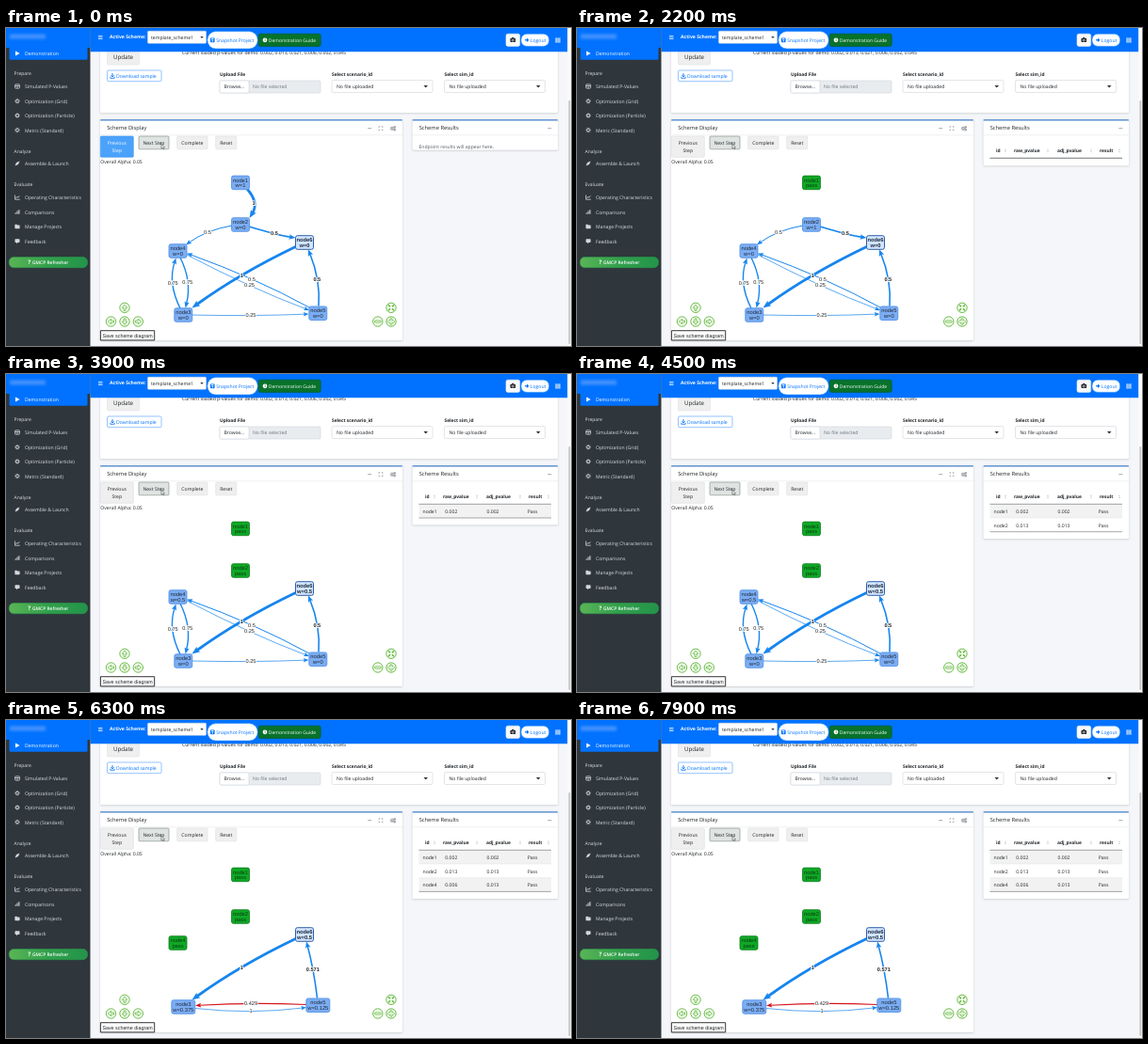
These frames come from a looping animation (600 px wide and 338 px high, 8000 ms). An HTML page with a canvas:

```html
<!DOCTYPE html>
<html lang="en">
<head>
<meta charset="utf-8">
<title>Scheme demonstration</title>
<style>
html, body { margin: 0; width: 100%; height: 100%; overflow: hidden; background: #f4f6f9; }
canvas { display: block; width: 600px; height: 338px; }
</style>
</head>
<body>
<canvas id="stage"></canvas>
<script>
const W = 600, H = 338, LOOP = 8000;
const canvas = document.getElementById('stage');
const c = canvas.getContext('2d');
const ratio = window.devicePixelRatio || 1;
canvas.width = W * ratio;
canvas.height = H * ratio;
c.textRendering = 'geometricPrecision';

const UI = '"Open Sans", "Noto Sans", sans-serif';
const GRAPH = '"Liberation Sans", Arial, sans-serif';
const BLUE = '#0072ff', INK = '#212529', EDGE = '#1685ee';

// Each click flashes the button, then the graph and the table follow.
const CLICKS = [[1600, 2000], [3500, 3900], [5500, 5900]];
const GRAPH_AT = [2000, 3900, 5900];
const ROW_AT = [2400, 4100, 6200];
const ROWS = [['node1', '0.002', '0.002'], ['node2', '0.013', '0.013'], ['node4', '0.006', '0.013']];
const passed = (times, t) => times.filter(at => t >= at).length;

function text(s, x, y, o = {}) {
  const size = o.size || 5.1;
  c.font = `${o.weight || 400} ${size}px ${o.font || UI}`;
  c.textAlign = o.align || 'left';
  c.textBaseline = 'alphabetic';
  c.fillStyle = o.color || INK;
  c.fillText(s, x, y + size * (o.font ? 0.35 : 0.41));
}

function box(x, y, w, h, fill, border, r = 0, line = 0.6) {
  c.beginPath();
  c.roundRect(x, y, w, h, r);
  if (fill) { c.fillStyle = fill; c.fill(); }
  if (border) { c.strokeStyle = border; c.lineWidth = line; c.stroke(); }
}

function path(points, color, width = 0.7, close = false, fill = null) {
  c.beginPath();
  points.forEach(([x, y], i) => i ? c.lineTo(x, y) : c.moveTo(x, y));
  if (close) c.closePath();
  if (fill) { c.fillStyle = fill; c.fill(); }
  if (color) { c.strokeStyle = color; c.lineWidth = width; c.stroke(); }
}

function ring(x, y, r, color, width = 0.7, fill = null) {
  c.beginPath();
  c.arc(x, y, r, 0, Math.PI * 2);
  if (fill) { c.fillStyle = fill; c.fill(); }
  if (color) { c.strokeStyle = color; c.lineWidth = width; c.stroke(); }
}

function card(x, y, w, h, title) {
  c.save();
  c.shadowColor = 'rgba(0,0,0,.22)';
  c.shadowBlur = 2 * ratio;
  c.shadowOffsetY = 0.5 * ratio;
  box(x, y, w, h, '#fff', null, 1);
  c.restore();
  if (!title) return;
  box(x, y, w, 1.4, '#3f80cc', null, 0.7);
  text(title, x + 7.2, y + 8.3, { size: 5.75 });
  path([[x, y + 16.6], [x + w, y + 16.6]], '#dfe2e6', 0.5);
}

function gear(x, y, r, color) {
  for (let i = 0; i < 8; i++) {
    const a = i * Math.PI / 4, dx = Math.cos(a), dy = Math.sin(a);
    path([[x + dx * r * 0.6, y + dy * r * 0.6], [x + dx * r, y + dy * r]], color, 0.8);
  }
  ring(x, y, r * 0.55, color, 0.9);
}

const ICONS = {
  table(x, y, k) {
    box(x - 2.4, y - 2.1, 4.8, 4.2, null, k, 0.6, 0.8);
    path([[x - 2.4, y - 0.5], [x + 2.4, y - 0.5]], k, 0.8);
    path([[x, y - 0.5], [x, y + 2]], k, 0.7);
  },
  gear(x, y, k) { gear(x, y, 2.7, k); },
  rocket(x, y, k) {
    path([[x - 2.5, y + 2.5], [x - 1, y - 1], [x + 2.5, y - 2.5], [x + 1, y + 1]], null, 0, true, k);
  },
  chart(x, y, k) {
    path([[x - 2.5, y - 2.4], [x - 2.5, y + 2.2], [x + 2.7, y + 2.2]], k, 0.8);
    path([[x - 1.4, y + 0.9], [x - 0.2, y - 0.8], [x + 0.8, y + 0.2], [x + 2.3, y - 1.6]], k, 0.8);
  },
  bars(x, y, k) {
    [1.6, 3.2, 4.6].forEach((h, i) => box(x - 2.3 + i * 1.8, y + 2.3 - h, 1.1, h, k));
  },
  folder(x, y, k) {
    box(x - 2.6, y - 1.5, 5.2, 3.7, k, null, 0.6);
    box(x - 2.6, y - 2.2, 2.4, 1.5, k, null, 0.4);
  },
  chat(x, y, k) {
    box(x - 2.5, y - 2.2, 5, 3.6, k, null, 0.7);
    path([[x - 1, y + 1], [x - 1, y + 2.7], [x + 1, y + 1]], null, 0, true, k);
  }
};

const MENU = [
  [62, 'Simulated P-Values', 'table'], [77.7, 'Optimization (Grid)', 'gear'],
  [93, 'Optimization (Particle)', 'gear'], [108.5, 'Metric (Standard)', 'gear'],
  [144, 'Assemble & Launch', 'rocket'], [180, 'Operating Characteristics', 'chart'],
  [195.5, 'Comparisons', 'bars'], [211, 'Manage Projects', 'folder'], [226.5, 'Feedback', 'chat']
];

function sidebar() {
  box(0, 0, 89.5, H, '#2f373d');
  box(0, 0, 89.5, 21, BLUE);
  c.save();
  c.filter = `blur(${1.6 * ratio}px)`;
  box(4, 6.5, 38, 5, '#4592ff');
  c.restore();
  box(3.5, 19, 83, 14.8, BLUE, null, 1.5);
  path([[10, 24.4], [14.6, 27], [10, 29.6]], null, 0, true, '#fff');
  text('Demonstration', 20, 26.8, { color: '#fff' });
  [['Prepare', 48], ['Analyze', 130.5], ['Evaluate', 166.3]].forEach(([s, y]) =>
    text(s, 8.5, y, { color: '#dde1e6', size: 5 }));
  MENU.forEach(([y, label, icon]) => {
    ICONS[icon](12, y, '#d3d7dd');
    text(label, 20, y, { color: '#d9dde3' });
  });
  const g = c.createLinearGradient(3, 0, 87, 0);
  g.addColorStop(0, '#5ab556');
  g.addColorStop(0.5, '#31a04c');
  g.addColorStop(1, '#23934a');
  box(3.2, 243.5, 83.3, 11.2, g, '#2a9a48', 5);
  text('?', 24.8, 248.8, { color: '#fff', size: 6.2, weight: 700, align: 'center' });
  text('GMCP Refresher', 28, 248.8, { color: '#fff', size: 4.9, weight: 600 });
}

function navbar() {
  box(89.5, 0, W - 89.5, 25.2, BLUE);
  [-1.6, 0, 1.6].forEach(d => path([[98, 10 + d], [102.5, 10 + d]], '#fff', 0.7));
  text('Active Scheme:', 110, 9.3, { color: '#fff', weight: 700 });
  box(150.5, 3.3, 62, 13, '#fff', '#ced4da', 1);
  text('template_scheme1', 154, 9.7);
  path([[206.3, 9], [209.7, 9], [208, 11]], null, 0, true, '#343a40');
  box(213.8, 3.6, 53.5, 18.5, '#fff', '#1c86ff', 9);
  box(217, 10.6, 4.6, 4.6, BLUE, null, 0.6);
  box(218, 11.2, 2.4, 1.2, '#fff');
  ring(219.3, 13.8, 0.7, null, 0, '#fff');
  text('Snapshot Project', 223.2, 12.8, { color: BLUE });
  box(268.2, 6.2, 66, 13.2, '#08722b', '#045c20', 2);
  ring(275, 12.8, 2.4, null, 0, '#fff');
  text('i', 275, 12.5, { color: '#08722b', size: 4, weight: 700, align: 'center' });
  text('Demonstration Guide', 278.8, 12.6, { color: '#fff', size: 5, weight: 500 });
  box(531, 6.2, 14.7, 13.2, '#f8f9fa', '#e2e6ea', 2);
  box(535.5, 10.9, 5.6, 4.1, INK, null, 0.7);
  box(537.1, 10, 2.4, 1.5, INK);
  ring(538.3, 13, 1.1, '#fff', 0.6);
  box(547, 6.2, 29.7, 13.2, '#fff', '#1c86ff', 6);
  path([[551, 12.8], [554.4, 12.8]], BLUE, 1.2);
  path([[553, 10.6], [555.4, 12.8], [553, 15]], null, 0, true, BLUE);
  text('Logout', 556.8, 12.7, { color: BLUE });
  for (let i = 0; i < 9; i++) box(583.4 + i % 3 * 1.9, 10.4 + Math.floor(i / 3) * 1.9, 1.4, 1.4, '#fff');
}

function picker(x, label) {
  text(label, x, 48.7, { weight: 700, size: 4.9 });
  box(x, 55.5, 107, 13, '#fff', '#ced4da', 1.5);
  text('No file uploaded', x + 5, 62);
  path([[x + 97.5, 60.9], [x + 102, 60.9], [x + 99.7, 63.4]], null, 0, true, '#333');
}

function inputs() {
  card(100, 18, 486, 72.3);
  text('Current loaded p-values for demo: 0.002, 0.013, 0.021, 0.006, 0.002, 0.045', 187, 25.9);
  box(107.5, 20, 34, 19, '#efefef', '#dfe1e3', 1);
  text('Update', 124.5, 30.3, { size: 6.2, align: 'center' });
  box(107.5, 45, 57.5, 11.7, '#fff', '#4c9dff', 1.5);
  path([[113, 48.2], [113, 51.6]], BLUE, 1);
  path([[111.3, 50.3], [113, 52], [114.7, 50.3]], BLUE, 0.8);
  path([[110.8, 51.8], [110.8, 53.3], [115.2, 53.3], [115.2, 51.8]], BLUE, 0.8);
  text('Download sample', 117, 50.6, { color: BLUE });
  text('Upload File', 227, 48.7, { weight: 700, size: 4.9 });
  box(227, 56, 107, 13, '#e9ecef', '#ced4da', 1.5);
  box(227, 56, 31, 13, '#fff', '#ced4da', 1.5);
  text('Browse...', 231.5, 62.4);
  text('No file selected', 262, 62.4, { color: '#6c757d' });
  picker(346, 'Select scenario_id');
  picker(465.5, 'Select sim_id');
}

function button(x, y, w, h, lines, fill, border, color) {
  box(x, y, w, h, fill, border, 1);
  lines.forEach((s, i) =>
    text(s, x + w / 2, y + h / 2 + (i - (lines.length - 1) / 2) * 8.2, { align: 'center', color }));
}

// A quadratic edge that passes through its middle point m.
function edge(a, m, b, width, label, o = {}) {
  const color = o.color || EDGE;
  const k = [2 * m[0] - (a[0] + b[0]) / 2, 2 * m[1] - (a[1] + b[1]) / 2];
  const ang = Math.atan2(b[1] - k[1], b[0] - k[0]);
  const len = 4.8 + width * 1.3, half = len * 0.4;
  const ux = Math.cos(ang), uy = Math.sin(ang);
  const base = [b[0] - ux * len, b[1] - uy * len];
  c.beginPath();
  c.moveTo(...a);
  c.quadraticCurveTo(...k, b[0] - ux * len * 0.7, b[1] - uy * len * 0.7);
  c.strokeStyle = color;
  c.lineWidth = width;
  c.stroke();
  path([b, [base[0] - uy * half, base[1] + ux * half], [base[0] + ux * len * 0.2, base[1] + uy * len * 0.2],
    [base[0] + uy * half, base[1] - ux * half]], null, 0, true, color);
  const size = 5.6, [x, y] = m, weight = o.bold ? 700 : 400;
  c.font = `${weight} ${size}px ${GRAPH}`;
  c.textAlign = 'center';
  c.lineWidth = 1.8;
  c.lineJoin = 'round';
  c.strokeStyle = '#fff';
  c.strokeText(label, x, y + size * 0.35);
  text(label, x, y, { size, font: GRAPH, align: 'center', weight, color: '#222' });
}

function node(x, y, name, weight, o = {}) {
  const w = weight.length > 5 ? 25 : 19;
  const fill = o.pass ? '#10a827' : o.chosen ? '#d2e5ff' : '#7cadf2';
  const border = o.pass ? '#0b7d1b' : o.chosen ? '#2f5fa8' : '#4a8ee6';
  box(x - w / 2, y - 7.3, w, 14.6, fill, border, 2, o.chosen ? 1 : 0.8);
  const style = { size: 5.8, font: GRAPH, align: 'center', weight: o.chosen ? 700 : 400, color: o.pass ? '#063f0c' : '#1d2b3d' };
  text(name, x, y - 2.8, style);
  text(o.pass ? 'pass' : weight, x, y + 2.9, style);
}

function graph(step) {
  if (step < 1) edge([256, 171], [263, 186], [258.5, 202], 2.8, '1', { bold: true });
  if (step < 2) {
    edge([240, 210], [214, 217.5], [191, 230.5], 1, '0.5');
    edge([258, 211], [285, 218.5], [307.5, 223], 1.7, '0.5', { bold: true });
  }
  if (step < 3) {
    edge([185, 244], [192.7, 270], [190.5, 297.5], 1.4, '0.75');
    edge([185, 298], [177.2, 271.2], [180.5, 244.5], 1.4, '0.75');
    edge([192, 241], [258.5, 273.5], [322, 300], 0.7, '0.25');
    edge([322, 297], [261, 267], [192, 239.5], 1, '0.5');
    edge([197.5, 305], [260, 305.5], [321.5, 304], 0.7, '0.25');
    edge([332, 295.5], [330.3, 266.8], [321, 235.5], 1.6, '0.5', { bold: true });
  } else {
    edge([201, 306.5], [260, 309.5], [319, 305.5], 0.7, '1');
    edge([319, 302.5], [260, 301.5], [201, 303.5], 1.1, '0.429', { color: '#d4151b' });
    edge([330.5, 295.5], [325.8, 265.3], [319, 235.5], 1.6, '0.571', { bold: true });
  }
  edge([307.5, 232.5], [250.3, 263], [197.5, 297.5], 2.9, '1', { bold: true });
  node(249, 164.4, 'node1', 'w=1', { pass: step > 0 });
  node(249, 209, 'node2', step > 0 ? 'w=1' : 'w=0', { pass: step > 1 });
  node(182.5, 237, 'node4', step > 1 ? 'w=0.5' : 'w=0', { pass: step > 2 });
  node(317, 228, 'node6', step > 1 ? 'w=0.5' : 'w=0', { chosen: true });
  node(188.3, 305, 'node3', step > 2 ? 'w=0.375' : 'w=0');
  node(331.3, 303.2, 'node5', step > 2 ? 'w=0.125' : 'w=0');
}

function controls() {
  const green = '#5cb636';
  const disc = (x, y) => ring(x, y, 5.2, green, 0.9, '#f4fbf0');
  [[126, 297.3, -90], [111.5, 312, 180], [126, 312, 90], [140.3, 312, 0]].forEach(([x, y, deg]) => {
    disc(x, y);
    c.save();
    c.translate(x, y);
    c.rotate(deg * Math.PI / 180);
    path([[-3, -1], [0, -1], [0, -2.6], [3.2, 0], [0, 2.6], [0, 1], [-3, 1]], green, 0.8, true, '#fff');
    c.restore();
  });
  disc(409, 297.3);
  [[-1, -1], [1, -1], [-1, 1], [1, 1]].forEach(([i, j]) =>
    path([[409 + i, 297.3 + j], [409 + i * 3, 297.3 + j * 3]], green, 1.4));
  disc(394.8, 312);
  disc(409, 312);
  [394.8, 409].forEach(x => box(x - 3.2, 311, 6.4, 2, '#fff', green, 0.4, 0.8));
  box(408, 308.8, 2, 6.4, '#fff', green, 0.4, 0.8);
  box(406.2, 311.4, 5.6, 1.2, '#fff');
}

function display(t, step) {
  card(100, 97.2, 321, 234.8, 'Scheme Display');
  const gray = '#8a9097';
  path([[384.2, 106.7], [388.2, 106.7]], gray, 0.8);
  [[-1, -1], [1, -1], [-1, 1], [1, 1]].forEach(([i, j]) =>
    path([[398 + i * 0.8, 106.7 + j * 2], [398 + i * 2, 106.7 + j * 2], [398 + i * 2, 106.7 + j * 0.8]], gray, 0.7));
  gear(410, 106.8, 2.2, gray);
  gear(412.8, 105.4, 1.2, gray);
  gear(412.8, 108.2, 1.2, gray);

  const fresh = t < CLICKS[0][0];
  const pressed = CLICKS.some(([from, to]) => t >= from && t < to);
  button(100.3, 115, 35, 22.3, ['Previous', 'Step'], fresh ? '#4ba2fb' : '#efefef', fresh ? '#3d94ee' : '#dcdee0', fresh ? '#fff' : INK);
  button(141, 115, 32, 13.8, ['Next Step'], pressed ? '#8fbc99' : '#dfe3e2', pressed ? '#72a57e' : '#78877f', pressed ? '#3f6a4b' : INK);
  button(181.7, 115, 32.3, 13.8, ['Complete'], '#efefef', '#dcdee0');
  button(222.7, 115, 22, 13.8, ['Reset'], '#efefef', '#dcdee0');
  text('Overall Alpha: 0.05', 100.3, 141.7);
  graph(step);
  controls();
  box(100.4, 321.7, 57.3, 10.2, '#fbfbfb', '#222', 0, 0.9);
  text('Save scheme diagram', 129, 326.8, { size: 5.35, align: 'center', font: GRAPH });
  // pointer
  path([[165, 123.4], [165, 128.2], [166.3, 127.3], [167.2, 128.9], [167.9, 128.5], [167.2, 127], [168.5, 126.9]],
    '#555', 0.6, true, '#f2f2f2');
}

function results(step, rows) {
  const h = step < 1 ? 32.5 : rows < 1 ? 49.3 : 48.6 + rows * 14.7;
  card(431.5, 97.2, 154.5, h, 'Scheme Results');
  path([[575.3, 106.7], [579.3, 106.7]], '#8a9097', 0.8);
  if (step < 1) {
    text('Endpoint results will appear here.', 438.5, 126.3, { color: '#555b61' });
    return;
  }
  [['id', 445, 455], ['raw_pvalue', 464, 500], ['adj_pvalue', 510, 546], ['result', 555, 576]].forEach(([s, x, sort]) => {
    text(s, x, 130.2, { weight: 700, size: 4.9 });
    path([[sort - 1, 129.8], [sort, 128.2], [sort + 1, 129.8]], null, 0, true, '#c4c8cc');
    path([[sort - 1, 130.8], [sort, 132.4], [sort + 1, 130.8]], null, 0, true, '#c4c8cc');
  });
  const top = 138.3;
  ROWS.slice(0, rows).forEach(([id, raw, adj], i) => {
    const y = top + i * 14.7;
    if (i % 2 === 0) box(438.5, y, 140.5, 14.7, '#f2f2f2');
    path([[438.5, y], [579, y]], '#dee2e6', 0.5);
    [[id, 442.5], [raw, 466.3], [adj, 510.5], ['Pass', 553.7]].forEach(([s, x]) => text(s, x, y + 7.7));
  });
  [top, top + rows * 14.7].forEach(y => path([[438.5, y], [579, y]], '#6a6e72', 0.6));
}

function draw(now) {
  const t = now % LOOP;
  const step = passed(GRAPH_AT, t);
  c.setTransform(ratio, 0, 0, ratio, 0, 0);
  box(0, 0, W, H, '#f4f6f9');
  inputs();
  display(t, step);
  results(step, passed(ROW_AT, t));
  navbar();
  sidebar();
  box(596.2, 0, 3.8, H, '#fafafa');
  box(597.4, 77, 1.8, 259, '#c1c3c5', null, 0.9);
}

const start = performance.now();
function tick() {
  draw(performance.now() - start);
  requestAnimationFrame(tick);
}
tick();
</script>
</body>
</html>
```
